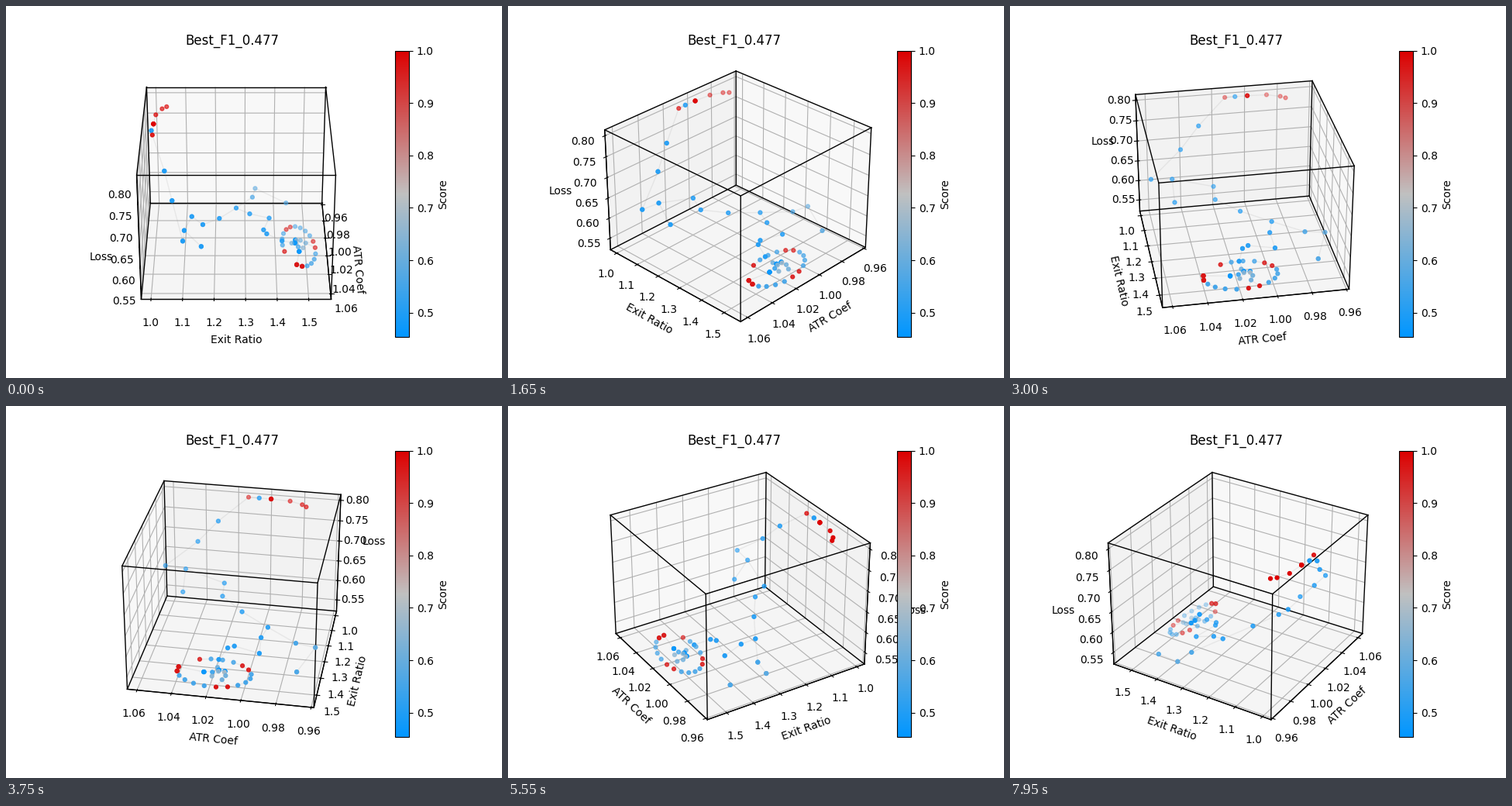
Write a matplotlib script that moves like this. It is 640 px wide and 480 px high and loops after 8000 ms.

```python
from itertools import combinations, product

import matplotlib.pyplot as plt
import numpy as np
from matplotlib.animation import FuncAnimation
from matplotlib.colors import LinearSegmentedColormap

INTERVAL, LOOP, HOLD = 50, 8000, 3   # ms, ms, ticks per pose
DEG_PER_POSE = 4

LOW = np.array([0.9585, 0.969, 0.5207])
HIGH = np.array([1.0657, 1.571, 0.8137])
BOX = np.array([1.1905, 1.1905, 0.8929])   # drawn size of the box

rng = np.random.default_rng(4)


def valley(y):
    """Loss falls off a steep hill, then slopes gently."""
    return -0.26 - 0.3 * y + 0.5 * np.exp(-((y + 0.54) / 0.17) ** 2)


def search_steps():
    """Yield x, y, z from the box centre, the score and the number of visits."""
    # Start: an arc of high scores on top of the hill.
    for i, s in enumerate(np.sin(np.linspace(0, np.pi / 2, 5))):
        yield 0.01 - 0.395 * s, -0.53 + 0.075 * s**6, 0.407, 1, 4 if i == 1 else 1

    # Descent: the main turns of the path and its side branches.
    turns = [(-0.06, -0.54), (0.20, -0.45), (0.33, -0.40), (0.54, -0.33),
             (0.40, -0.325), (0.40, -0.22), (0.13, -0.285), (0.13, -0.215),
             (-0.02, -0.11), (-0.21, 0.0), (-0.18, 0.09), (-0.19, 0.22),
             (-0.41, 0.11), (-0.54, 0.13), (-0.45, 0.34),
             (-0.02, 0.18), (0.02, 0.20), (0.06, 0.30)]
    for x, y in turns:
        yield x, y, valley(y), 0.5 + 0.25 * max(0, -x - 0.2), 2

    # Basin: a dense core inside a ring with three high-scoring arcs.
    for i, (x, y) in enumerate(rng.normal((0.07, 0.39), (0.04, 0.03), (10, 2))):
        yield x, y, valley(y), 0.47 if i < 3 else rng.uniform(0.5, 0.72), 4 if i < 3 else 1
    for angle in np.linspace(-0.2, 5.2, 18):
        x, y = 0.07 + 0.24 * np.cos(angle), 0.41 + 0.11 * np.sin(angle)
        high = np.cos(3.4 * angle) > 0.3
        yield x, y, valley(y), 0.97 if high else 0.55, 3 if angle < 0.2 else 1


steps = np.array(list(search_steps()))
offsets, scores, visits = steps[:, :3], steps[:, 3], steps[:, 4].astype(int)
points = (LOW + HIGH) / 2 + (HIGH - LOW) * offsets / BOX

fig = plt.figure(figsize=(6.4, 4.8), dpi=100)
ax = fig.add_subplot(projection="3d")
ax.set(xlim=(LOW[0], HIGH[0]), ylim=(LOW[1], HIGH[1]), zlim=(LOW[2], HIGH[2]),
       xlabel="ATR Coef", ylabel="Exit Ratio", zlabel="Loss", title="Best_F1_0.477")


def segment(a, b, **style):
    ax.plot(*zip(a, b), **style)


for a, b in combinations(product((0, 1), repeat=3), 2):
    if sum(i != j for i, j in zip(a, b)) == 1:
        segment(*(LOW + (HIGH - LOW) * np.array(c) for c in (a, b)), color="black", lw=1)

# Each step of the search branches off the nearest earlier one.
for i in range(1, len(points)):
    gaps = np.linalg.norm(offsets[:i] - offsets[i], axis=1)
    segment(points[gaps.argmin()], points[i], color="gray", alpha=0.12, lw=1)

cmap = LinearSegmentedColormap.from_list("score", ["#0096ff", "#c0c0c0", "#dc0000"])
dots = ax.scatter(*np.repeat(points, visits, axis=0).T, c=np.repeat(scores, visits),
                  cmap=cmap, vmin=0.4533, vmax=1, s=12, linewidths=1)
fig.colorbar(dots, ax=ax, label="Score")


def update(tick):
    ax.view_init(elev=30, azim=DEG_PER_POSE * (tick // HOLD))
    return []


anim = FuncAnimation(fig, update, frames=LOOP // INTERVAL, interval=INTERVAL,
                     init_func=lambda: update(0), repeat=True)
plt.show()
```
